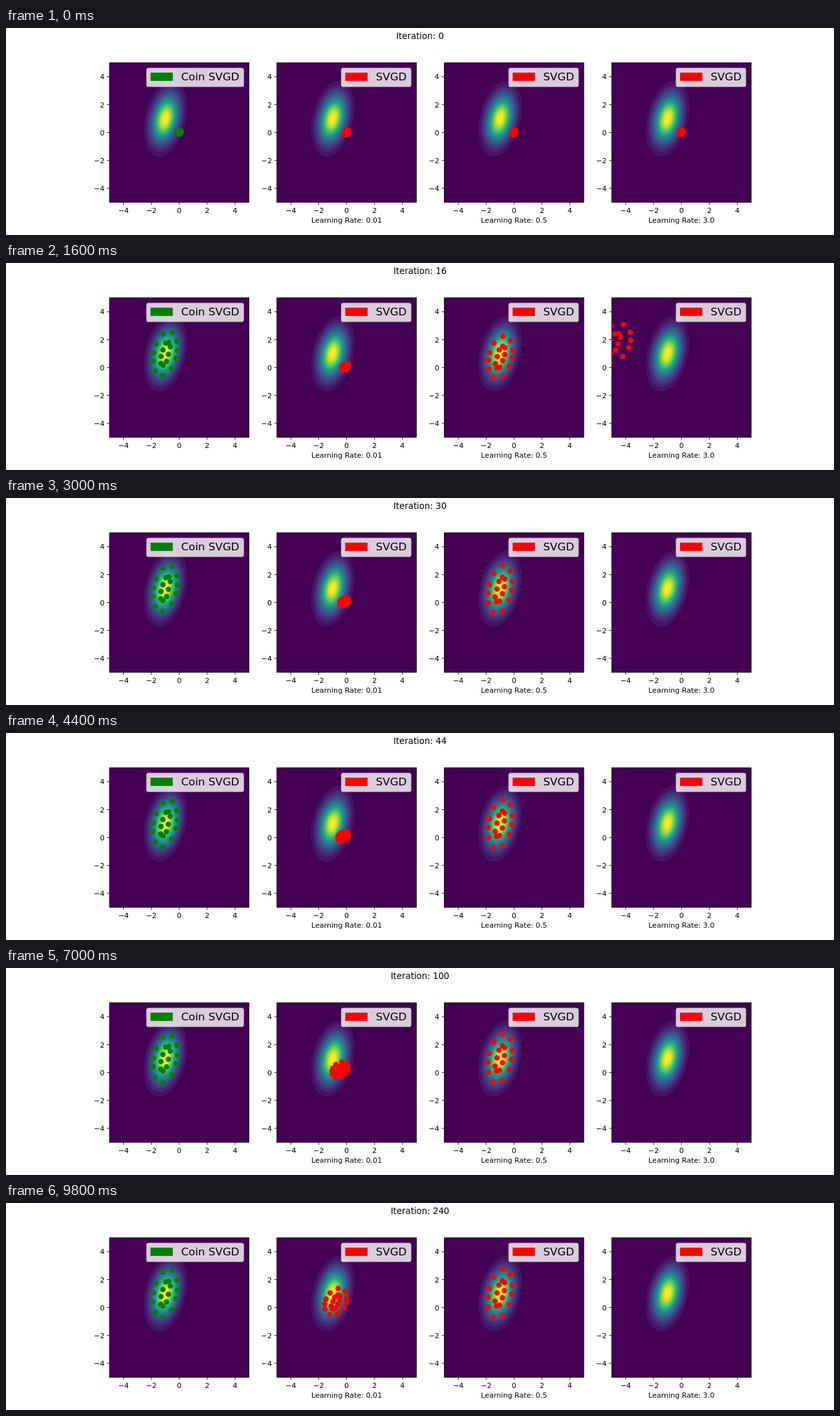
Recreate the animation shown at these times as an HTML page with a canvas. Size 1280 px wide and 320 px high, loop 10 s.

```html
<!DOCTYPE html>
<html lang="en">
<head>
<meta charset="utf-8">
<title>Particle inference</title>
<style>
html, body { margin: 0; width: 100%; height: 100%; overflow: hidden; background: #fff; }
canvas { display: block; }
</style>
</head>
<body>
<canvas id="stage" width="1280" height="320"></canvas>
<script>
const ctx = document.getElementById("stage").getContext("2d");
const FONT = '"DejaVu Sans", Verdana, sans-serif';
const SIZE = 215.65, PITCH = 258.78, UNIT = SIZE / 10;
const TOP = 53.77, BOTTOM = TOP + SIZE, MID = TOP + SIZE / 2;
const RHO = 0.29, SKEW = Math.sqrt(1 - RHO * RHO);
const OUTER = 11, INNER = 9;

const mix = (a, b, f) => a + (b - a) * f;
const settle = (n, tau) => 1 - Math.exp(-n / tau);
const rad = deg => deg * Math.PI / 180;

// Settled particles form two tilted rings, packed along the long axis
function ringPoint(i) {
  let a, r;
  if (i < OUTER) {
    a = rad(61 - i * 360 / OUTER);
    a += 0.2 * Math.sin(2 * (a - rad(75)));
    r = 1;
  } else {
    a = rad(95 - (i - OUTER) * 360 / INNER);
    a -= 0.2 * Math.sin(2 * (a - rad(60)));
    r = 0.4 + 0.13 * Math.cos(2 * (a - rad(60)));
  }
  const u = r * Math.cos(a), v = r * Math.sin(a);
  return [19 * u, -38 * (RHO * u + SKEW * v)];
}
const ring = Array.from({ length: OUTER + INNER }, (_, i) => ringPoint(i));

// Each rule gives the cloud's centre (0 = start, 1 = peak) and its scale
function coin(n) {
  const g = 1 - Math.exp(-Math.pow(n / 5, 1.5));
  return { cx: g, cy: g, sx: mix(0.16, 1, g), sy: mix(0.1, 1, g) * (1 - 0.25 / (1 + n / 10)) };
}

function flow(time) {
  return {
    cx: settle(time, 160),
    cy: settle(time, 470),
    sx: -mix(0.16, 1, settle(time, 105)),
    sy: -mix(0.1, 1, settle(time, 350))
  };
}

// Too large a step: the cloud bursts apart, then is thrown out on the left
function wild(n) {
  const g = settle(n, 2.5), q = Math.pow(n / 16, 6);
  return {
    cx: g + 3.85 * q,
    cy: g + 0.74 * q,
    sx: mix(0.16, mix(2, 1.4, Math.min(q, 1)), g),
    sy: mix(0.1, mix(2.2, 0.8, Math.min(q, 1)), g)
  };
}

const panels = [
  { name: "Coin SVGD", color: "#008000", cloud: coin },
  { name: "SVGD", color: "#ff0000", cloud: flow, rate: "0.01" },
  { name: "SVGD", color: "#ff0000", cloud: n => flow(40 * n), rate: "0.5" },
  { name: "SVGD", color: "#ff0000", cloud: wild, rate: "3.0" }
];

const stops = ["440154", "482878", "3e4989", "31688e", "26828e",
  "1f9e89", "35b779", "6ece58", "b5de2b", "fde725"]
  .map(hex => hex.match(/../g).map(h => parseInt(h, 16)));

function viridis(v) {
  const s = v * (stops.length - 1), i = Math.min(stops.length - 2, Math.floor(s));
  return `rgb(${stops[i].map((c, j) => Math.round(mix(c, stops[i + 1][j], s - i)))})`;
}

function text(str, x, y, size, align = "center") {
  ctx.font = `${size}px ${FONT}`;
  ctx.textAlign = align;
  ctx.fillStyle = "#000";
  ctx.fillText(str, x, y);
}

function density(cx) {
  const levels = 20, outer = Math.sqrt(2 * Math.log(levels));
  const sx = 1.57 * UNIT / outer, sy = 2.72 * UNIT / outer;
  for (let k = 1; k < levels; k++) {
    ctx.save();
    ctx.transform(sx, -sy * RHO, 0, -sy * SKEW, cx - UNIT, MID - UNIT);
    ctx.beginPath();
    ctx.arc(0, 0, Math.sqrt(2 * Math.log(levels / k)), 0, 7);
    ctx.restore();
    ctx.fillStyle = viridis(k / (levels - 1));
    ctx.fill();
  }
}

function particles(panel, x0, n) {
  const c = panel.cloud(n);
  ctx.fillStyle = panel.color;
  for (const [dx, dy] of ring) {
    ctx.beginPath();
    ctx.arc(x0 - UNIT * c.cx + dx * c.sx, MID - UNIT * c.cy + dy * c.sy, 4.17, 0, 7);
    ctx.fill();
  }
}

function legend(right, name, color) {
  const em = 16.667;
  ctx.font = `${em}px ${FONT}`;
  const w = 60 + ctx.measureText(name).width, x = right - em / 2 - w, y = TOP + em / 2;
  ctx.beginPath();
  ctx.roundRect(x, y, w, 28.7, em / 5);
  ctx.fillStyle = "rgba(255,255,255,0.8)";
  ctx.fill();
  ctx.strokeStyle = "rgba(204,204,204,0.8)";
  ctx.lineWidth = 1.1;
  ctx.stroke();
  ctx.fillStyle = color;
  ctx.fillRect(x + 6.1, 69, 34.4, 12.8);
  text(name, x + 53.33, 81.3, em, "left");
}

function axes(left, cx) {
  ctx.strokeStyle = "#000";
  ctx.lineWidth = 0.89;
  ctx.strokeRect(left, TOP, SIZE, SIZE);
  ctx.beginPath();
  for (let v = -4; v <= 4; v += 2) {
    const label = String(v).replace("-", "\u2212");
    const x = cx + v * UNIT, y = MID - v * UNIT;
    ctx.moveTo(x, BOTTOM);
    ctx.lineTo(x, BOTTOM + 3.9);
    ctx.moveTo(left, y);
    ctx.lineTo(left - 3.9, y);
    text(label, x, 285.8, 11.11);
    text(label, left - 7.8, y + 4.1, 11.11, "right");
  }
  ctx.stroke();
}

function drawPanel(panel, k, n) {
  const left = 160 + k * PITCH, cx = left + SIZE / 2;
  ctx.save();
  ctx.beginPath();
  ctx.rect(left, TOP, SIZE, SIZE);
  ctx.clip();
  ctx.fillStyle = viridis(0);
  ctx.fillRect(left, TOP, SIZE, SIZE);
  density(cx);
  particles(panel, cx, n);
  ctx.restore();
  axes(left, cx);
  legend(left + SIZE, panel.name, panel.color);
  if (panel.rate) text("Learning Rate: " + panel.rate, cx, 301, 11.11);
}

// The counter speeds up: steps of 2, then 5, then 10
function iteration(step) {
  if (step <= 25) return 2 * step;
  if (step <= 35) return 50 + 5 * (step - 25);
  return 100 + 10 * (step - 35);
}

function draw() {
  const n = iteration(Math.floor(performance.now() % 10000 / 200));
  ctx.fillStyle = "#fff";
  ctx.fillRect(0, 0, 1280, 320);
  text("Iteration: " + n, 640, 16.6, 13.333);
  panels.forEach((panel, k) => drawPanel(panel, k, n));
  requestAnimationFrame(draw);
}
draw();
</script>
</body>
</html>
```
